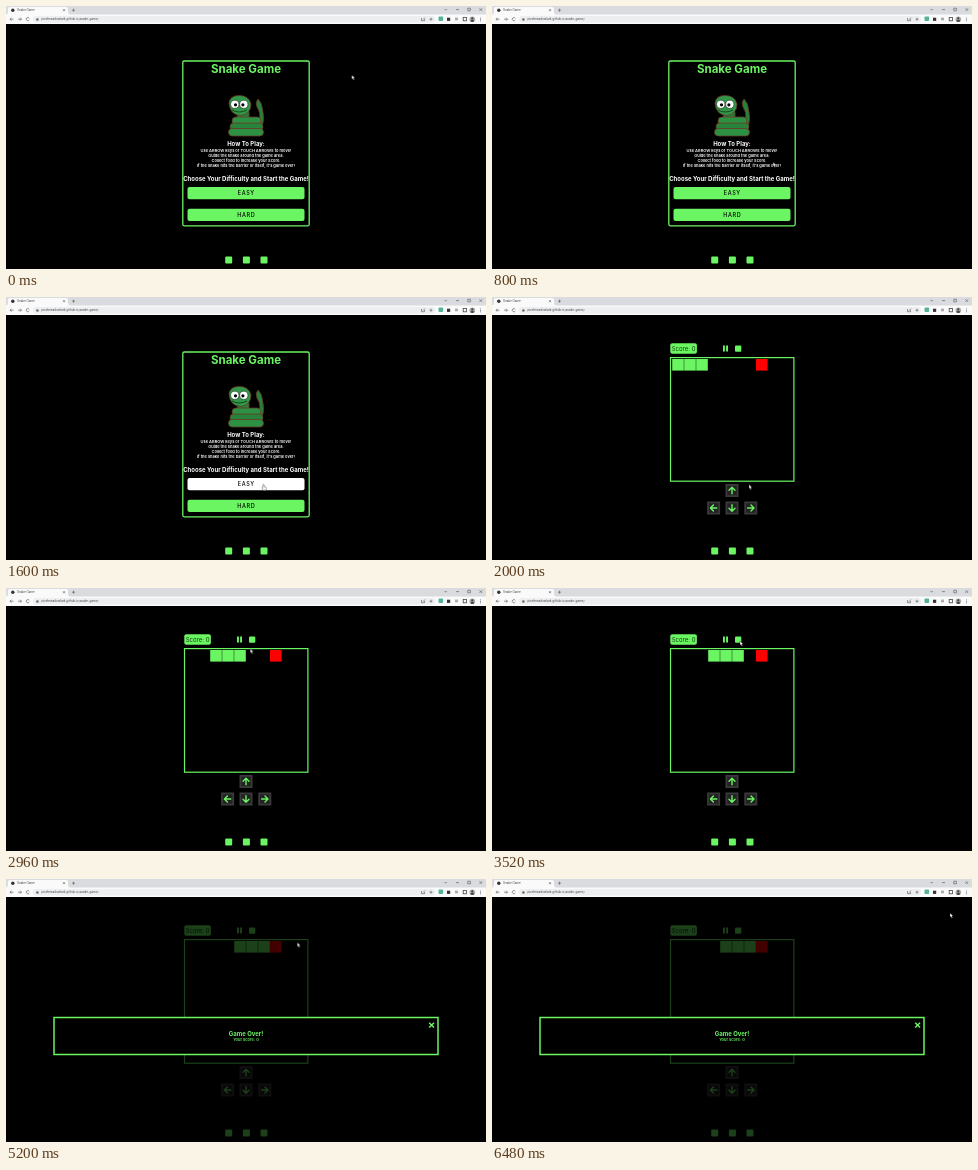
An HTML page for the animation above (6.56 s loop, 480x263 px).

```html
<!DOCTYPE html>
<html lang="en">
<head>
<meta charset="utf-8">
<title>Snake Game</title>
<style>
  :root { --green: #6bf562; --loop: 6560ms; }
  html, body { margin: 0; width: 100%; height: 100%; overflow: hidden; background: #000; }
  svg { display: block; width: 100vw; height: 100vh; }
  text { font-family: Inter, "Liberation Sans", sans-serif; }
  .mid { text-anchor: middle; }
  .green { fill: var(--green); }
  .frame { fill: none; stroke: var(--green); }
  .bold { font-weight: 700; font-size: 6px; }
  .note { font-weight: 600; font-size: 4px; }
  .button { font-weight: 500; font-size: 5.5px; letter-spacing: .6px; }
  .tiny { font-size: 3px; fill: #444; }
  .line { fill: none; stroke: #666; stroke-width: .7; }
  .arrow { fill: none; stroke: var(--green); stroke-width: 1.4; stroke-linecap: round; stroke-linejoin: round; }

  .menu, .game, .over, .easy, .hand, .pointer, .player { animation: var(--loop) step-end infinite; }
  .menu { animation-name: menu; }
  .game { animation-name: game; }
  .over { animation-name: over; }
  .easy { animation-name: hover; }
  .hand { animation-name: hand; }
  .pointer { animation-name: pointer; }
  .player { animation-name: crawl; }
  .cursor { animation: move var(--loop) linear infinite; }

  @keyframes menu { 0% { opacity: 1 } 30.45%, 100% { opacity: 0 } }
  @keyframes game { 0% { opacity: 0 } 30.45%, 100% { opacity: 1 } }
  @keyframes over { 0% { opacity: 0 } 65.8%, 100% { opacity: 1 } }
  @keyframes hover { 0% { fill: var(--green) } 14.6%, 100% { fill: #fff } }
  @keyframes hand { 0% { opacity: 0 } 14.6% { opacity: 1 } 30.45%, 100% { opacity: 0 } }
  @keyframes pointer { 0% { opacity: 1 } 14.6% { opacity: 0 } 30.45%, 100% { opacity: 1 } }
  @keyframes crawl {
    0% { transform: none }
    37.75% { transform: translateX(12px) }
    45.05% { transform: translateX(24px) }
    53.6% { transform: translateX(36px) }
    60.9%, 100% { transform: translateX(48px) }
  }
  @keyframes move {
    0% { transform: translate(345.7px, 69px) }
    7.317% { transform: translate(345.7px, 69px); animation-timing-function: ease-in-out }
    14.634% { transform: translate(262px, 182px) }
    17.073%, 19.512% { transform: translate(259.5px, 184.5px) }
    21.951% { transform: translate(257px, 187.5px) }
    32.927% { transform: translate(257px, 187.5px); animation-timing-function: ease-in-out }
    43.902% { transform: translate(245px, 64px) }
    45.122% { transform: translate(244.3px, 60.7px) }
    53.659%, 69.512% { transform: translate(248px, 53px) }
    73.171%, 74.39% { transform: translate(280px, 63px) }
    79.268% { transform: translate(291.3px, 63.5px) }
    85.366% { transform: translate(291.3px, 63.5px); animation-timing-function: ease-in-out }
    93.902%, 95.122% { transform: translate(459.5px, 34.5px) }
    98.78%, 100% { transform: translate(458px, 34px) }
  }
</style>
</head>
<body>
<svg viewBox="0 0 480 263" preserveAspectRatio="none">
  <defs>
    <g id="key">
      <rect x="-6.5" y="-6.5" width="13" height="13" fill="#3a3a3a"/>
      <rect x="-4.7" y="-4.7" width="9.4" height="9.4" fill="#222"/>
      <path class="arrow" d="M0 3.2V-3M-3 -.2L0 -3.2L3 -.2"/>
    </g>
    <rect id="cell" y="62" width="11.6" height="11.6"/>
  </defs>
  <rect width="480" height="263"/>

  <!-- start menu -->
  <g class="menu">
    <rect class="frame" x="176.8" y="55" width="126.4" height="164.8" rx="1.5" stroke-width="1.3"/>
    <text class="mid green" x="240" y="66.6" font-size="11.5" font-weight="700">Snake Game</text>

    <g stroke="#6b3524" stroke-width=".8" stroke-linejoin="round">
      <path fill="#26823a" d="M248 119Q258 112 251 101Q249 96 252 93Q256 97 256.5 103Q259 113 256 121Z"/>
      <path fill="#26823a" d="M233 106H243Q244 111 241 115L232 116Q230 111 233 106Z"/>
      <rect fill="#2c9142" x="226" y="111" width="29" height="8" rx="4"/>
      <rect fill="#27833b" x="224" y="117" width="33" height="7.5" rx="3.7"/>
      <rect fill="#2c9142" x="222.5" y="122.5" width="35" height="7.5" rx="3.7"/>
      <path fill="#309848" d="M223 97Q224 89.5 233 89.5Q243 89.5 245 98Q245 108 235 109.5Q224 109 223 97Z"/>
    </g>
    <path d="M226 104Q233 108 241 104" fill="none" stroke="#123f1a" stroke-width=".9"/>
    <g fill="#fff" stroke="#111" stroke-width=".5">
      <circle cx="228.8" cy="98.3" r="4.1"/>
      <circle cx="237.8" cy="98.3" r="4.1"/>
    </g>
    <circle cx="229.5" cy="98.8" r="1.6"/>
    <circle cx="236.9" cy="98.8" r="1.6"/>

    <g class="mid" fill="#fff">
      <text class="bold" x="240" y="140">How To Play:</text>
      <g class="note">
        <text x="240" y="145.6">Use ARROW keys or TOUCH ARROWS to move!</text>
        <text x="240" y="150.6">Guide the snake around the game area.</text>
        <text x="240" y="155.6">Collect food to increase your Score.</text>
        <text x="240" y="160.6">If the snake hits the barrier or itself, it's game over!</text>
      </g>
      <text class="bold" x="240" y="175">Choose Your Difficulty and Start the Game!</text>
    </g>
    <rect class="easy" x="181.5" y="181" width="117" height="12.3" rx="2"/>
    <rect class="green" x="181.5" y="202.8" width="117" height="12.3" rx="2"/>
    <text class="mid button" x="240.3" y="189.2">EASY</text>
    <text class="mid button" x="240.3" y="211">HARD</text>
  </g>

  <!-- game -->
  <g class="game">
    <rect class="green" x="178.3" y="46.3" width="26.6" height="10.5" rx="2"/>
    <text class="mid" x="191.6" y="53.8" font-size="6" fill="#123b10">Score: 0</text>
    <path class="green" d="M231 48.5h1.9v6h-1.9zM234.1 48.5h1.9v6h-1.9z"/>
    <rect class="green" x="243" y="48.5" width="6.3" height="6.2" rx="1"/>
    <rect class="frame" x="178.5" y="60.6" width="123.4" height="123.6" stroke-width="1.2"/>
    <use href="#cell" x="264" fill="#f00"/>
    <g class="player green">
      <use href="#cell" x="180.2"/>
      <use href="#cell" x="192.2"/>
      <use href="#cell" x="204.2"/>
    </g>
    <use href="#key" transform="translate(240 193.5)"/>
    <use href="#key" transform="translate(221.6 211) rotate(-90)"/>
    <use href="#key" transform="translate(240 211) rotate(180)"/>
    <use href="#key" transform="translate(258.8 211) rotate(90)"/>
  </g>

  <g class="green">
    <rect x="219.2" y="250.5" width="7" height="7" rx="1"/>
    <rect x="236.9" y="250.5" width="7" height="7" rx="1"/>
    <rect x="254.5" y="250.5" width="7" height="7" rx="1"/>
  </g>

  <!-- game over -->
  <g class="over">
    <rect y="18" width="480" height="245" fill-opacity=".74"/>
    <rect x="48" y="138.5" width="384" height="37" fill="#000" stroke="var(--green)" stroke-width="1.5"/>
    <text class="mid green bold" x="240" y="156.6">Game Over!</text>
    <text class="mid green note" x="240" y="162.4">Your score: 0</text>
    <path class="frame" d="M423.2 143.7l4.8 4.8m0 -4.8l-4.8 4.8" stroke-width="1.5"/>
  </g>

  <!-- browser -->
  <rect width="480" height="9" fill="#d9dbdf"/>
  <rect y="8.5" width="480" height="9.5" fill="#fafafa"/>
  <path d="M0 9Q2 8 2 6V2.5Q2 1 4 1H60Q62 1 62 2.5V6Q62 8 64 9Z" fill="#fafafa"/>
  <circle cx="6.8" cy="4.3" r="1.7" fill="#333"/>
  <text class="tiny" x="11" y="5.4">Snake Game</text>
  <path class="line" d="M57 3.2l2 2m0 -2l-2 2M66 4.2h3M67.5 2.7v3"/>
  <rect x="27" y="10" width="402" height="6.6" rx="3.3" fill="#eceef0"/>
  <path class="line" d="M7.5 13.2H4m1.5 -1.5L4 13.2l1.5 1.5M12 13.2h3.5m-1.5 -1.5l1.5 1.5l-1.5 1.5M23.2 12.3a1.6 1.6 0 1 0 .1 1.6"/>
  <rect x="30.3" y="12.5" width="2.2" height="2" fill="#555"/>
  <text class="tiny" x="35.5" y="14.3">pixelmeadowlark.github.io/snake-game/</text>
  <path class="line" d="M415.5 12v2.7h3v-1.7m-1.5 .5l2 -2M423.5 13.2h3M425 11.7v3"/>
  <rect x="432.5" y="10.5" width="4.6" height="4.6" rx="1" fill="#54b29b"/>
  <rect x="441" y="11.7" width="3.2" height="3.2" fill="#333"/>
  <path class="line" d="M449 12.2h3m-3 1.5h3"/>
  <rect x="457.2" y="11.4" width="3.2" height="3.4" fill="none" stroke="#444" stroke-width=".8"/>
  <circle cx="466.3" cy="13.2" r="2.8" fill="#aaa"/>
  <path d="M464.2 15.1Q466.3 12.3 468.4 15.1Q466.3 17 464.2 15.1Z" fill="#444"/>
  <circle cx="466.3" cy="12.4" r="1.1" fill="#444"/>
  <path d="M474.5 11.5v3.8" stroke="#555" stroke-width=".8" stroke-dasharray=".8 .7"/>
  <path class="line" d="M438.5 3l1.2 1.2l1.2 -1.2M450 3.6h3M461.8 2.2h2.6v2.6h-2.6zM473.5 2.3l2.6 2.6m0 -2.6l-2.6 2.6"/>

  <g class="cursor" fill="#fff" stroke="#000" stroke-width=".35">
    <path class="pointer" d="M0 0V4.3L1 3.4L1.8 5.2L2.6 4.8L1.9 3.1H3.1Z"/>
    <path class="hand" d="M0 0Q.7 -.4 1 .3V2.1L3 2.6Q3.6 2.9 3.4 3.8L3 5.7H.5L-1.2 3.5Q-1.1 2.7 -.2 3.2Z"/>
  </g>
</svg>
</body>
</html>
```
